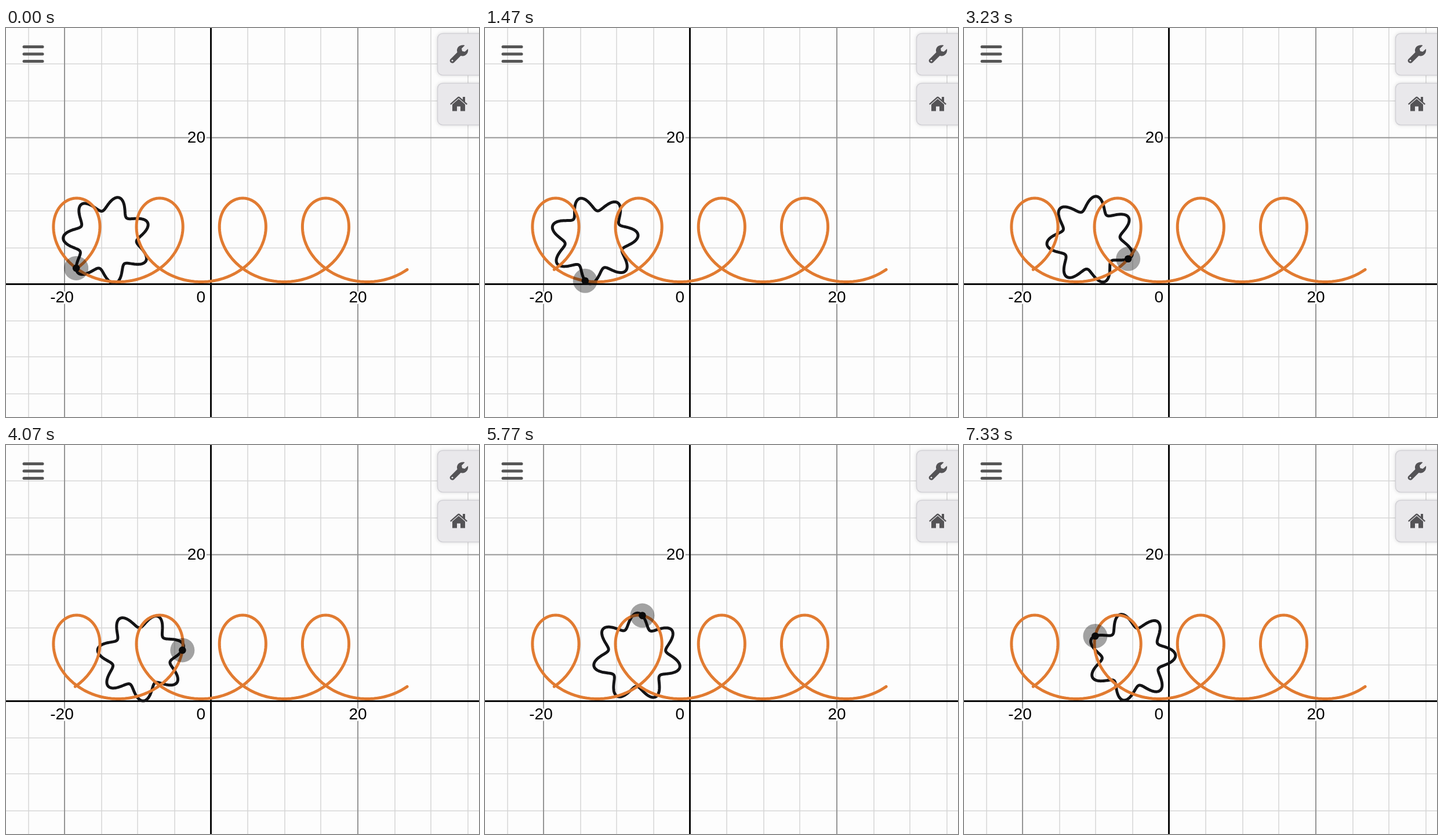
Write an HTML page that moves like this. It is 816x672 px and loops after 7.36 s.

```html
<!DOCTYPE html>
<html lang="en">
<head>
<meta charset="utf-8">
<title>Rolling curve</title>
<style>
  html, body { margin: 0; width: 100%; height: 100%; overflow: hidden; background: #fdfdfd; }
  svg { display: block; width: 816px; height: 672px; }
  text { font: 28px "Liberation Sans", Arial, sans-serif; fill: #000;
         stroke: #fdfdfd; stroke-width: 6px; stroke-linejoin: round; paint-order: stroke; }
  .curve { fill: none; stroke-width: 5; stroke-linecap: round; stroke-linejoin: round; }
  .button { fill: #e9e8eb; stroke: #d2d1d6; stroke-width: 1.5; filter: drop-shadow(0 0 3px #0002); }
  .icon { fill: #545356; }
</style>
</head>
<body>
<svg viewBox="0 0 816 672">
  <path id="minor" stroke="#d7d7d7" stroke-width="1.6"/>
  <path d="M101 0V672M607 0V672M0 189.5H816" stroke="#959595" stroke-width="2"/>
  <path d="M353.5 0V672M0 442.5H816" stroke="#0a0a0a" stroke-width="3"/>

  <text x="344" y="198" text-anchor="end">20</text>
  <text x="344" y="474" text-anchor="end">0</text>
  <text x="96.5" y="474" text-anchor="middle">-20</text>
  <text x="607" y="474" text-anchor="middle">20</text>

  <path id="wheel" class="curve" stroke="#141416"/>
  <path id="trail" class="curve" stroke="#e17b31"/>
  <g id="dot">
    <circle r="21" fill="#000" opacity=".36"/>
    <circle r="6.3" fill="#0a0a0a"/>
  </g>

  <path d="M31 32.5H63M31 45H63M31 57.5H63" stroke="#565656" stroke-width="5" stroke-linecap="round"/>
  <rect class="button" x="744.5" y="9.5" width="80" height="72" rx="9"/>
  <rect class="button" x="744.5" y="95.5" width="80" height="72" rx="9"/>
  <path class="icon" d="M766.5 54L778.5 42C776 34 783 28 791.5 30L786 35.5L787 40L791.5 41L797 36C798.5 44 792 50 784.5 48L772.5 60C769 62.5 763.5 58 766.5 54Z"/>
  <circle cx="770" cy="56.3" r="1.4" fill="#e9e8eb"/>
  <path class="icon" d="M770 132L781 122.5L792 132V143.5H784V135.5H778V143.5H770Z"/>
  <path class="icon" d="M766 131L779.5 119Q781 117.8 782.5 119L788 123.8V119H792V127.4L796 131L794.5 132.8L781 121L767.5 132.8Z"/>
</svg>
<script>
  const unit = 12.66, originX = 353.4, originY = 442.2;
  const LOOP = 7.36, HOLD = 0.657, START = -2.403, SPEED = 0.752;
  const el = id => document.getElementById(id);

  // The wheel centre drifts right as the wheel turns anticlockwise by phi.
  const centre = phi => [originX + unit * (1.8 * phi - 9.8), originY - 6 * unit];
  const radius = a => unit * (5 + Math.cos(7 * a));
  const mark = Math.PI / 4;

  function penAt(phi) {
    const [x, y] = centre(phi), r = radius(mark);
    return [x + r * Math.cos(phi), y - r * Math.sin(phi)];
  }

  function plot(point, from, to, steps) {
    const pts = [];
    for (let i = 0; i <= steps; i++) {
      pts.push(point(from + (to - from) * i / steps).map(v => v.toFixed(2)).join(" "));
    }
    return "M" + pts.join("L");
  }

  const columns = [39, 165, 227, 291, 417, 481, 543, 671, 733, 797];
  const rows = [62, 126, 252, 316, 380, 506, 568, 632];
  el("minor").setAttribute("d",
    columns.map(x => `M${x} 0V672`).join("") + rows.map(y => `M0 ${y}H816`).join(""));
  el("trail").setAttribute("d", plot(penAt, -mark - 2 * Math.PI, -mark + 6 * Math.PI, 800));
  el("wheel").setAttribute("d", plot(
    a => [radius(a) * Math.cos(a), -radius(a) * Math.sin(a)], 0, 2 * Math.PI, 420) + "Z");

  function draw(now) {
    const t = now / 1000 % LOOP;
    const phi = START + SPEED * Math.max(0, t - HOLD);
    const turn = (mark - phi) * 180 / Math.PI;
    el("wheel").setAttribute("transform", `translate(${centre(phi)}) rotate(${turn})`);
    el("dot").setAttribute("transform", `translate(${penAt(phi)})`);
  }

  const begin = performance.now();
  function tick() {
    draw(performance.now() - begin);
    requestAnimationFrame(tick);
  }
  tick();
</script>
</body>
</html>
```
